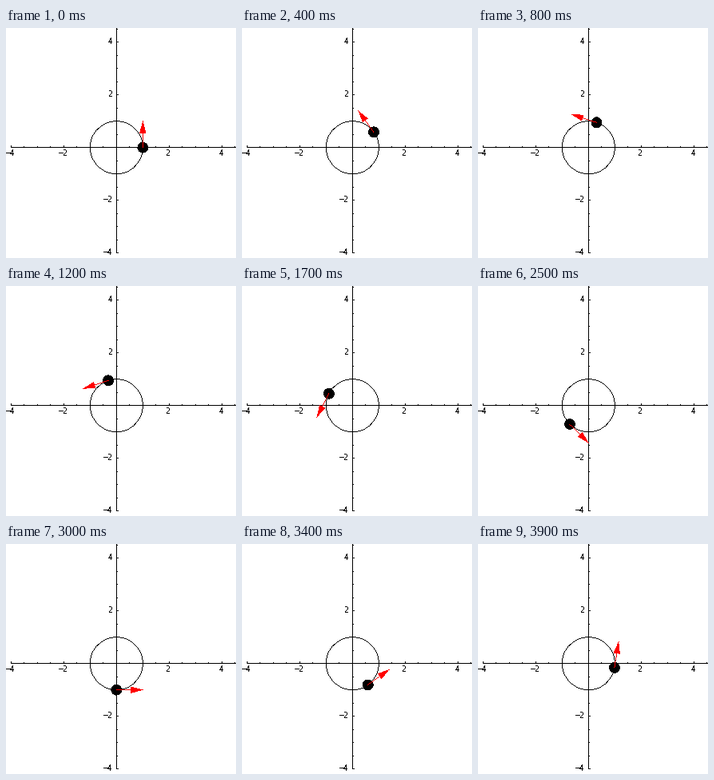
Write a matplotlib script that moves like this. It is 288 px wide and 288 px high and loops after 4000 ms.

```python
import math

import matplotlib.pyplot as plt
import numpy as np
from matplotlib.animation import FuncAnimation

SIZE = 288
UNIT = 33
CX, CY = 137.8, 149.2
BALL_RADIUS = 6.9
HEAD_LENGTH, HEAD_HALF_WIDTH = 15, 4
FRAMES = 40
INTERVAL = 100
BLACK, RED, WHITE = (0, 0, 0), (255, 0, 0), (255, 255, 255)

rows, cols = np.mgrid[:SIZE, :SIZE]


def to_px(x, y):
    return CX + UNIT * x, CY - UNIT * y


def plot(image, xs, ys, color):
    image[np.rint(ys).astype(int), np.rint(xs).astype(int)] = color


def line(image, x0, y0, x1, y1, color=BLACK):
    steps = math.ceil(max(abs(x1 - x0), abs(y1 - y0))) + 1
    plot(image, np.linspace(x0, x1, steps), np.linspace(y0, y1, steps), color)


def circle(image, radius):
    reach = math.ceil(radius * math.sqrt(0.5))
    along = np.arange(-reach, reach + 1)
    across = np.sqrt(radius ** 2 - along ** 2)
    for sign in (-1, 1):
        plot(image, CX + along, CY + sign * across, BLACK)
        plot(image, CX + sign * across, CY + along, BLACK)


def label(x, y, value, ha):
    ax.text(x, y, str(value).replace("-", "\u2212"), size=10, ha=ha,
            va="baseline", family="DejaVu Sans Mono", antialiased=False)


def draw_axes(image):
    line(image, 6, CY, SIZE - 1, CY)
    line(image, CX, 0, CX, 281)
    for i in range(-8, 10):
        if i == 0:
            continue
        x, y = to_px(i / 2, i / 2)
        major = i % 4 == 0
        length = 2 if major else 1
        line(image, x, CY - length, x, CY)
        line(image, CX, y, CX + length, y)
        if major:
            label(round(x) - 0.5, 160, i // 2, "center")
            label(134, round(y) + 3, i // 2, "right")


def draw_arrow(image, x, y, dx, dy):
    tip_x, tip_y = x + UNIT * dx, y + UNIT * dy
    line(image, x, y, tip_x, tip_y, RED)
    back = (tip_x - cols) * dx + (tip_y - rows) * dy
    side = np.abs((cols - tip_x) * dy - (rows - tip_y) * dx)
    inside = (back >= 0) & (back <= HEAD_LENGTH)
    image[inside & (side <= HEAD_HALF_WIDTH * back / HEAD_LENGTH + 0.2)] = RED


fig = plt.figure(figsize=(SIZE / 72, SIZE / 72), dpi=72, facecolor="white")
ax = fig.add_axes([0, 0, 1, 1])
ax.axis("off")

background = np.full((SIZE, SIZE, 3), WHITE, dtype=np.uint8)
draw_axes(background)
circle(background, UNIT)
picture = ax.imshow(background, extent=(0, SIZE, SIZE, 0), aspect="auto",
                    interpolation="nearest")


def update(k):
    angle = 2 * math.pi * k / FRAMES
    c, s = math.cos(angle), math.sin(angle)
    x, y = to_px(c, s)
    image = background.copy()
    image[np.hypot(cols - x, rows - y) <= BALL_RADIUS] = BLACK
    draw_arrow(image, x, y, -s, -c)
    picture.set_data(image)
    return [picture]


anim = FuncAnimation(fig, update, frames=FRAMES, interval=INTERVAL,
                     repeat=True, repeat_delay=0, blit=False)
plt.show()
```
